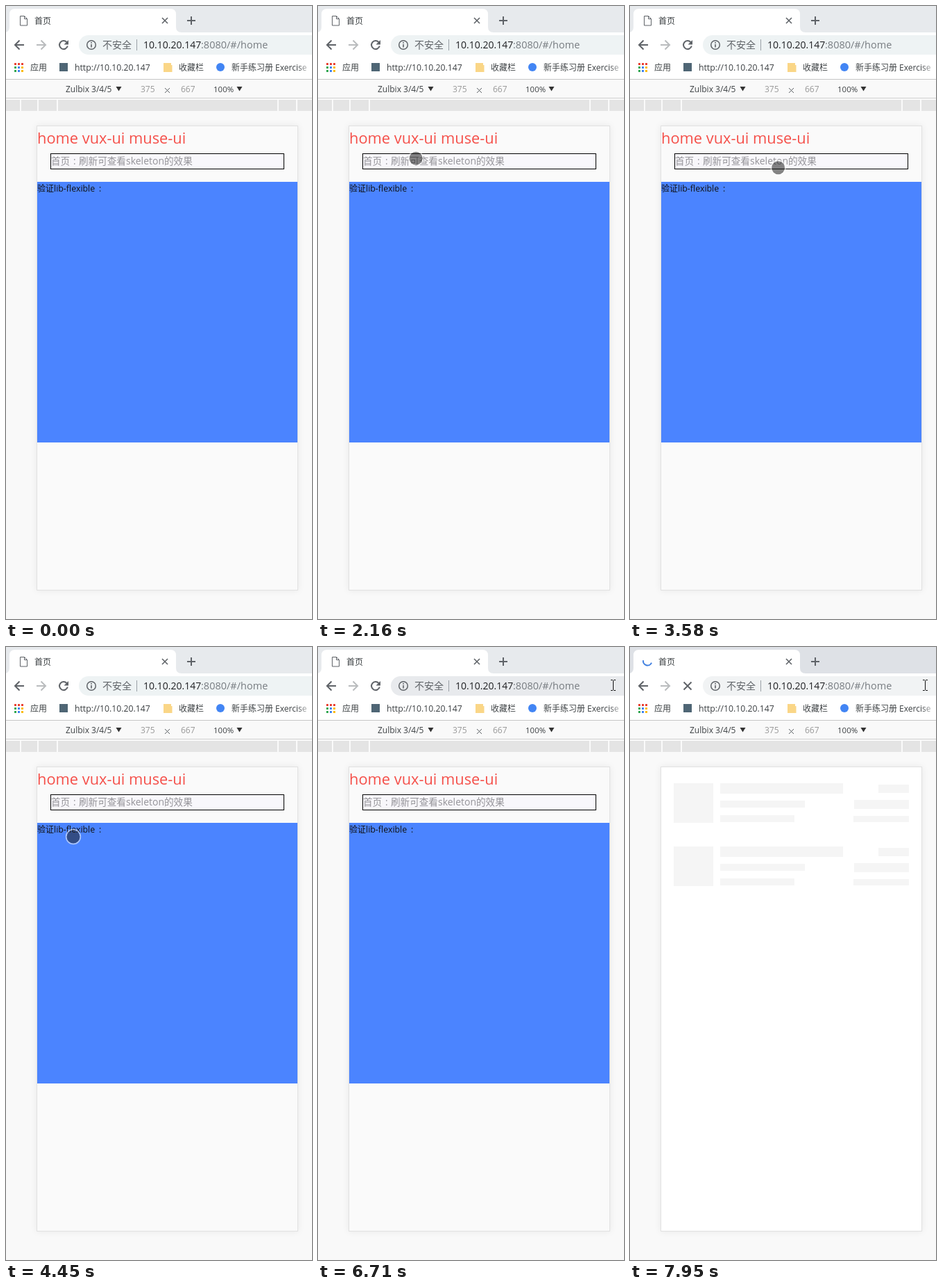
Animation, 441 px wide and 882 px high, one loop 8 s. Source, as an HTML page:

```html
<!DOCTYPE html>
<html lang="zh-CN">
<head>
<meta charset="utf-8">
<title>首页</title>
<style>
html, body { margin: 0; width: 100%; height: 100%; overflow: hidden; background: #f9f9f9; }
svg { display: block; width: 100vw; height: 100vh; }
text { font: 12px "Open Sans", "Noto Sans CJK SC", sans-serif; fill: #3c4043; white-space: pre; }
.icon { fill: none; stroke: #5f6368; }
.gray { fill: #999; }
.red { font-size: 21.8px; fill: #f5504a; }
.hint { font-size: 13.6px; fill: #949398; }
.url { font-size: 14px; fill: #202124; }
.soft { font-size: 14px; fill: #5f6368; }
.path { font-size: 14.5px; fill: #777c81; }
.black { fill: #111; }
</style>
</head>
<body>
<svg viewBox="0 0 441 882">
  <defs>
    <linearGradient id="fade">
      <stop stop-color="#fff" stop-opacity="0"/><stop offset="1" stop-color="#fff"/>
    </linearGradient>
    <filter id="shadow" x="-5%" y="-5%" width="110%" height="110%">
      <feDropShadow dx="0" dy="0" stdDeviation="4" flood-opacity=".07"/>
    </filter>
  </defs>
  <rect width="441" height="882" fill="#f9f9f9"/>

  <!-- tab strip -->
  <rect id="strip" width="441" height="38"/>
  <path d="M-3 38Q5 38 5 30V12Q5 4 13 4H237Q245 4 245 12V30Q245 38 253 38Z" fill="#fff"/>
  <path id="docIcon" class="icon" d="M20.5 14.5h6l4 4v9.5h-10zM26.5 14.5v4h4"/>
  <path id="spinner" class="icon" stroke-width="2" d="M-5.9 -1.8A6.2 6.2 0 0 0 6 1.5"/>
  <text x="41" y="25.5">首页</text>
  <path class="icon" stroke-width="1.6" d="M225 17l8 8m0-8l-8 8"/>
  <path class="icon" stroke-width="2" d="M261 21h12m-6-6v12"/>

  <!-- toolbar -->
  <rect y="38" width="441" height="67" fill="#fff"/>
  <path class="icon" stroke-width="2" d="M26 56H13m6.5-6.5L13 56l6.5 6.5"/>
  <path class="icon" stroke-width="2" style="stroke:#babcbe" d="M44 56h13m-6.5-6.5L57 56l-6.5 6.5"/>
  <g id="reload">
    <path class="icon" stroke-width="2" d="M87.5 52A6 6 0 1 0 88.8 57.6"/>
    <path d="M90 49v6.5h-6.5z" fill="#5f6368"/>
  </g>
  <path id="stop" class="icon" stroke-width="2" d="M77.5 50.5l11 11m0-11l-11 11"/>
  <rect id="omnibox" x="105" y="42" width="370" height="28" rx="14"/>
  <circle class="icon" stroke-width="1.5" cx="123" cy="56" r="6.3"/>
  <path class="icon" stroke-width="1.6" d="M123 55v4.5M123 52v1.7"/>
  <text class="soft" x="139" y="61">不安全</text>
  <path d="M188.5 48v16" stroke="#9aa0a6"/>
  <text class="url" x="198" y="61">10.10.20.147</text>
  <text class="path" x="281" y="61">:8080/#/home</text>

  <!-- bookmarks -->
  <g id="apps"></g>
  <text x="35" y="93">应用</text>
  <rect x="77" y="82" width="12" height="12" fill="#4f6675"/>
  <text x="99" y="93" style="font-size:12.25px">http://10.10.20.147</text>
  <path d="M227 82h11v3h1.5v10H227z" fill="#fad687"/>
  <text x="249" y="93">收藏栏</text>
  <circle cx="309" cy="88" r="6" fill="#4285f4"/>
  <text x="325" y="93">新手练习册 Exercise</text>
  <rect x="420" y="78" width="21" height="22" fill="url(#fade)"/>
  <path d="M0 105.5h441" stroke="#c6c6c6"/>

  <!-- device bar -->
  <text x="86" y="124">Zulbix 3/4/5</text>
  <text class="gray" x="194" y="124">375</text>
  <path class="icon" d="M229 118l7 7m0-7l-7 7"/>
  <text class="gray" x="252" y="124">667</text>
  <text x="299" y="124" style="font-size:11.5px">100%</text>
  <path d="M158.5 116h8l-4 6.5zM332.5 116h8l-4 6.5z" fill="#333"/>
  <path d="M0 132.5h441" stroke="#cfcfcf"/>
  <rect y="135" width="441" height="16" fill="#e4e4e4"/>
  <path d="M21 135v16M46 135v16M74 135v16M392 135v16M419 135v16" stroke="#fafafa" stroke-width="2"/>

  <!-- device screen -->
  <rect id="screen" x="44.5" y="172.5" width="376" height="668" stroke="#e1e1e1" filter="url(#shadow)"/>
  <g id="home">
    <text class="red" x="45" y="198">home vux-ui muse-ui</text>
    <rect x="64.5" y="212.5" width="336" height="22" fill="#f8f7fb" stroke="#000"/>
    <text class="hint" x="65" y="228">首页</text>
    <text class="hint" x="97" y="228">:</text>
    <text class="hint" x="105" y="228">刷新可查看</text>
    <text class="hint" x="173" y="228" style="font-size:14px">skeleton</text>
    <text class="hint" x="228" y="228">的效果</text>
    <rect x="45" y="253" width="375" height="375" fill="#4b84ff"/>
    <text class="black" x="45" y="267">验证</text>
    <text class="black" x="69" y="267" style="font-size:12.4px">lib-flexible</text>
    <text class="black" x="134" y="267">:</text>
  </g>
  <g id="skeleton" fill="#f5f5f5">
    <g id="card">
      <path d="M63 196h57v57H63z"/>
      <path d="M130 196h177v15H130zM130 221h122v10H130zM130 242h107v10H130z"/>
      <path d="M402 198h-44v12h44zM402 220h-79v13h79zM402 243h-80v9h80z"/>
    </g>
    <use href="#card" y="91"/>
  </g>

  <!-- pointers -->
  <g id="touch">
    <circle r="10.3" fill="none" stroke="#fff" stroke-opacity=".55" stroke-width="1.7"/>
    <circle r="9.5" fill="#202020" fill-opacity=".55"/>
  </g>
  <path id="arrow" d="M0 0v16l3.7-3.5 2.5 5.7 2.4-1-2.4-5.6h5z" fill="#fff" stroke="#000"/>
  <path id="beam" fill="none" stroke="#111" d="M-3-7.5h2.5l1 1 1-1h2.5M-3 7.5h2.5l1-1 1 1h2.5M.5-6.5v13"/>
</svg>
<script>
const LOOP = 8000;
const STEP = 78; // the screen is refreshed this often while something moves
const el = id => document.getElementById(id);
const show = (id, on) => { el(id).style.display = on ? '' : 'none'; };
const mix = (a, b, p) => a.map((v, i) => v + (b[i] - v) * p);

// App launcher: a red row over rows of green, blue and yellow dots
for (let i = 0; i < 9; i++) {
  const color = i < 3 ? '#ea4335' : ['#34a853', '#4285f4', '#fbbc05'][i % 3];
  el('apps').innerHTML +=
    `<rect x="${12 + i % 3 * 5}" y="${82 + Math.floor(i / 3) * 5}" width="3" height="3" fill="${color}"/>`;
}

const entry = [375, 940];
const moves = [
  { start: 70, end: 850, to: [83, 223] },
  { start: 920, end: 1000, to: [72, 196] },
  { start: 1230, end: 1540, to: [135, 196] },
  { start: 1770, end: 1850, to: [221, 186] },
  { start: 2010, end: 2390, to: [108, 233] },
  { start: 2470, end: 2790, to: [146, 226] },
  { start: 2870, end: 3740, to: [216, 233] },
  { start: 3970, end: 4200, to: [150, 291] },
  { start: 4280, end: 4450, to: [97, 273] },
  { start: 6000, end: 6710, to: [425, 55] }
];

// Fraction of the steps between start and end that are done at time t
function stepped(t, start, end) {
  const steps = Math.round((end - start) / STEP) + 1;
  const done = Math.floor((t - start) / STEP + 0.15) + 1;
  return Math.max(0, Math.min(1, done / steps));
}

const easeOut = p => Math.sin(p * Math.PI / 2);

const pointerAt = t => moves.reduce(
  (pos, { start, end, to }) => t < start ? pos : mix(pos, to, easeOut(stepped(t, start, end))), entry);

function drawPointer([x, y]) {
  const kind = y > 860 ? '' : y > 172 ? 'touch' : y > 71 ? 'arrow' : 'beam';
  for (const id of ['touch', 'arrow', 'beam']) show(id, id === kind);
  if (kind) el(kind).setAttribute('transform', `translate(${x} ${y})`);
  return kind;
}

const fill = (id, from, to, p) => el(id).setAttribute('fill', `rgb(${mix(from, to, p).map(Math.round)})`);

function draw(t) {
  const hovered = drawPointer(pointerAt(t)) === 'beam';
  const active = stepped(t, 6860, 7020);
  fill('strip', [231, 234, 237], [222, 225, 230], active);
  fill('omnibox', hovered ? [232, 234, 237] : [238, 243, 244], [241, 243, 244], active);

  const loading = t >= 7640, waiting = t < 7800, blank = t >= 7870;
  show('docIcon', !loading);
  show('reload', !loading);
  show('spinner', loading);
  show('stop', loading);
  el('spinner').style.stroke = waiting ? '#80868b' : '#3f7fe0';
  el('spinner').setAttribute('transform',
    `translate(25 21) rotate(${(t - 7950) * (waiting ? -0.2 : 0.3)})`);
  show('home', !blank);
  show('skeleton', blank);
  el('screen').setAttribute('fill', blank ? '#fff' : '#fafafa');
}

const begin = performance.now();
function tick() {
  draw((performance.now() - begin) % LOOP);
  requestAnimationFrame(tick);
}
tick();
</script>
</body>
</html>
```
